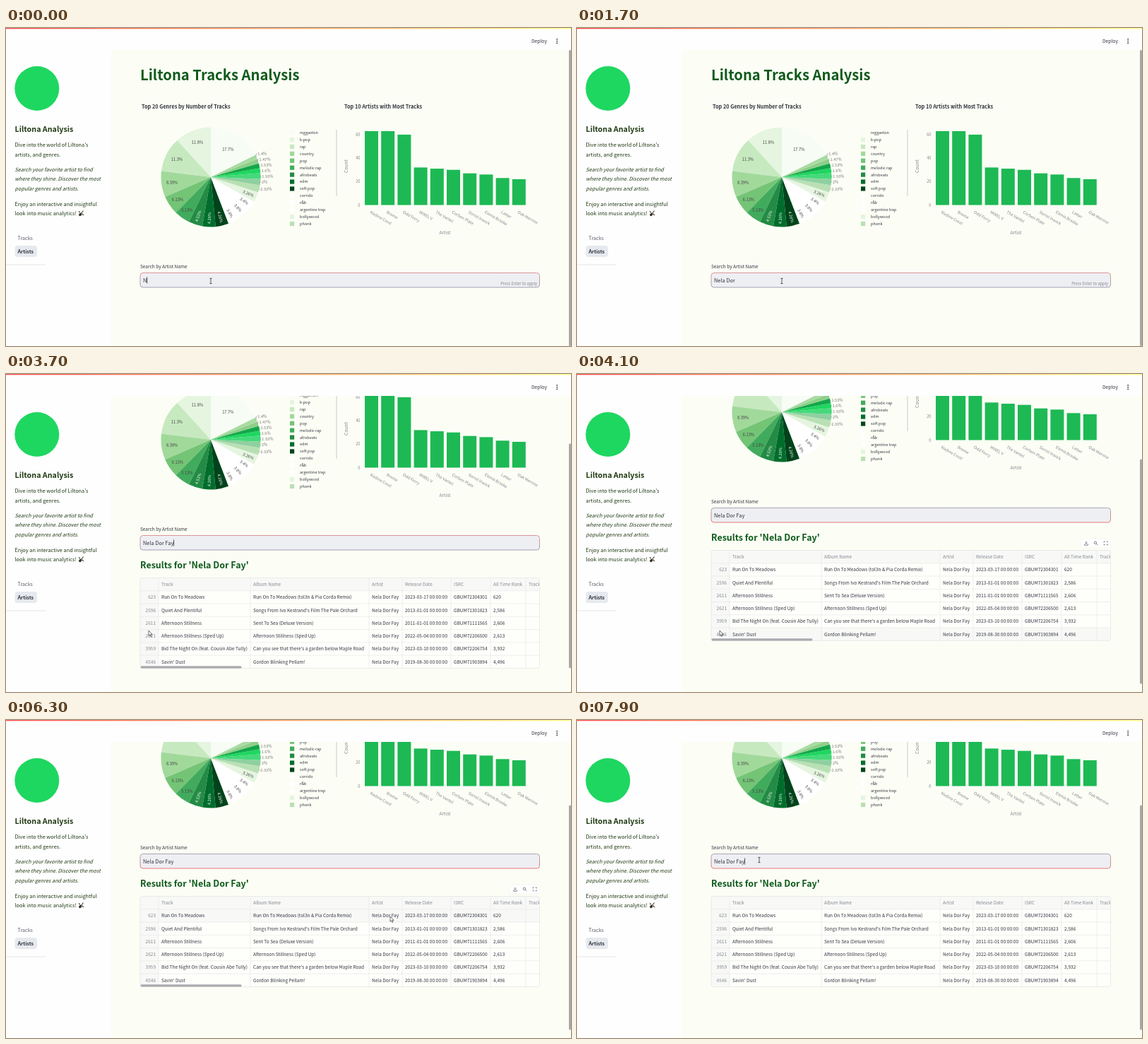
Animation of 800x450 px, one loop 8 s. Source, as an HTML page:

```html
<!DOCTYPE html>
<html lang="en">
<head>
<meta charset="utf-8">
<title>Tracks Analysis</title>
<style>
html, body { margin: 0; width: 100%; height: 100%; overflow: hidden; background: #fefefe; }
svg { display: block; }
text { font-family: "Noto Sans CJK JP", "Noto Sans CJK SC", "Noto Sans", sans-serif; white-space: pre; }
</style>
</head>
<body>
<svg id="stage" width="800" height="450" viewBox="0 0 800 450"></svg>
<script>
const LOOP = 8000, STEP = 100;
const ARTIST = 'Nela Dor Fay', BRAND = 'Liltona';
const INK = '#31333f', GRAY = '#83868f', GREEN = '#0f5a1c', LEAF = '#1f3a12';
const $ = id => document.getElementById(id);

// Text is placed by the vertical middle of its capitals.
const text = (x, y, size, str, fill = INK, extra = '') =>
  `<text x="${x}" y="${(y + size * .365).toFixed(2)}" font-size="${size}" fill="${fill}" ${extra}>${str.replace(/&/g, '&amp;')}</text>`;
const rect = (x, y, w, h, fill, extra = '') =>
  `<rect x="${x}" y="${y}" width="${w}" height="${h}" fill="${fill}" ${extra}/>`;
const line = (d, stroke, w = .6) => `<path d="${d}" fill="none" stroke="${stroke}" stroke-width="${w}"/>`;
const BOLD = 'font-weight="700"', MID = 'text-anchor="middle"', END = 'text-anchor="end"';

function pie() {
  const shares = [17.7, 11.8, 11.3, 8.39, 6.13, 5.13, 4.53, 4.26, 4.26, 3.8, 3.8, 3.4, 3.26, 2.33, 2, 1.93, 1.6, 1.53, 1.47, 1.4];
  const fills = ['#f7fcf5', '#e5f5e0', '#c7e9c0', '#a1d99b', '#74c476', '#41ab5d', '#238b45', '#006d2c', '#00441b',
    '#fff', '#fff', '#fff', '#e5f5e0', '#b9e0b4', '#8fd0a0', '#45d97a', '#1ed760', '#12a84a', '#8fce8a', '#a8dba2'];
  const genres = ['reggaeton', 'k-pop', 'rap', 'country', 'pop', 'melodic rap', 'afrobeats', 'edm', 'soft pop',
    'corrido', 'r&b', 'argentine trap', 'bollywood', 'phonk'];
  const at = (deg, r) => [290 + r * Math.sin(deg * Math.PI / 180), 211 - r * Math.cos(deg * Math.PI / 180)];
  let out = '', labels = '', a = shares[0] * 3.6;
  shares.forEach((p, i) => {
    const b = a - p * 3.6, mid = ((a + b) / 2 + 360) % 360;
    out += `<path d="M290 211L${at(a, 70.5)}A70.5 70.5 0 0 0 ${at(b, 70.5)}Z" fill="${fills[i]}"/>`;
    if (i > 12) {
      const [x, y] = at(mid, 70), ly = i === 13 ? 228 : 178 + (19 - i) * 8;
      labels += line(`M${x} ${y}V${ly}h1.5`, '#777', .5) + text(x + 2.3, ly, 5.6, p + '%', '#777');
    } else {
      const [x, y] = at(mid, i ? Math.min(58, 51 + 1.5 * i) : 46);
      const turn = i < 6 ? 0 : mid > 180 ? mid + 90 : mid - 90;
      labels += text(x, y, 5.7, p + '%', i > 5 && i < 9 ? '#fff' : '#444', `${MID} transform="rotate(${turn} ${x} ${y})"`);
    }
    a = b;
  });
  genres.forEach((g, i) => {
    const y = 148 + i * 9.92;
    labels += rect(402, y - 3, 6.2, 6.2, fills[i]) + text(416, y, 5.5, g);
  });
  return out + labels + line('M468 144V238', '#c8cbc8', 1);
}

function bars() {
  const names = ['Nadine Crost', 'Brome', 'Odd Ferry', 'MIREL V', 'The Vantel', 'Corben Plate', 'Sorrel Inwick',
    'Elenia Brasko', 'Latter', 'Oak Merrine'];
  const counts = [63, 63, 60, 32, 31, 30, 27, 26, 23, 22];
  let out = '';
  counts.forEach((n, i) => {
    const x = 508 + i * 23.2, h = n * 1.66;
    out += rect(x, 250.5 - h, 19, h, '#1db954') +
      text(x + 8, 260, 5.7, names[i], GRAY, `transform="rotate(30 ${x + 8} 260)"`);
  });
  for (let v = 0; v <= 60; v += 20) out += text(501.5, 250.5 - v * 1.66, 5.7, '' + v, GRAY, END);
  return out + text(621.5, 290, 6.5, 'Artist', GRAY, MID) +
    text(481.5, 195.5, 6.7, 'Count', GRAY, `${MID} transform="rotate(-90 481.5 195.5)"`);
}

const TOP = 406.5, ROW = 18.27;
function table() {
  const edges = [216, 346, 514, 561, 630, 686, 736];
  const rows = [
    ['', 'Track', 'Album Name', 'Artist', 'Release Date', 'ISRC', 'All Time Rank', 'Track ID'],
    ['623', 'Run On To Meadows', 'Run On To Meadows (tol3n & Pia Corda Remix)', ARTIST, '2023-03-17', 'GBUM72304301', '620'],
    ['2596', 'Quiet And Plentiful', 'Songs From Ivo Kestrand\'s Film The Pale Orchard', ARTIST, '2013-01-01', 'GBUM71301823', '2,586'],
    ['2611', 'Afternoon Stillness', 'Sent To Sea (Deluxe Version)', ARTIST, '2011-01-01', 'GBUM71111565', '2,606'],
    ['2621', 'Afternoon Stillness (Sped Up)', 'Afternoon Stillness (Sped Up)', ARTIST, '2022-05-04', 'GBUM72206500', '2,613'],
    ['3959', 'Bid The Night On (feat. Cousin Abe Tully)', 'Can you see that there\'s a garden below Maple Road', ARTIST, '2023-03-10', 'GBUM72206754', '3,932'],
    ['4546', 'Savin\' Dust', 'Gordon Blinking Pellam!', ARTIST, '2019-08-30', 'GBUM71903894', '4,496']];
  let out = rect(190, TOP, 565.5, ROW * 7, '#fefffb', 'rx="3"') + rect(190, TOP, 565.5, ROW, '#f8f9f7') +
    rect(190, TOP, 26, ROW * 7, '#f8f9f7') + rect(190, 0, 565.5, ROW, '#f8f9f7', 'id="hover"');
  edges.forEach(x => out += line(`M${x} ${TOP}v${ROW * 7}`, '#e3e5e6'));
  rows.forEach((cells, r) => {
    const y = TOP + ROW * (r + .5);
    if (r) out += line(`M190 ${TOP + ROW * r}H755.5`, '#e3e5e6');
    cells.forEach((c, i) => {
      if (r && i === 4) c += ' 00:00:00';
      out += i ? text(edges[i - 1] + 4, y, 6.5, c, r ? INK : GRAY) : text(212, y, 6.5, c, GRAY, END);
    });
  });
  return `<clipPath id="grid">${rect(190, TOP, 565.5, ROW * 7, '#000', 'rx="3"')}</clipPath><g clip-path="url(#grid)">${out}</g>` +
    rect(190, TOP, 565.5, ROW * 7, 'none', 'rx="3" stroke="#e0e2e3" stroke-width=".7"') +
    rect(190.5, TOP + ROW * 7 - 3.2, 143, 3.2, '#a9abaf', 'id="hbar" rx="1.5"') +
    `<g id="tools">${rect(713, 390, 42.5, 13, '#fff', 'rx="3" stroke="#eceeee" stroke-width=".5"')}
    ${line('M721 393.6v3.6m-1.6-1.4l1.6 1.6 1.6-1.6M718.6 397.6v1.6h4.8v-1.6', '#60636f', .8)}
    <circle cx="734" cy="395.8" r="1.7" fill="none" stroke="#60636f" stroke-width=".8"/>
    ${line('M735.3 397.1l2 2M746.2 395.4v-1.5h1.5m2 0h1.5v1.5m0 2v1.5h-1.5m-2 0h-1.5v-1.5', '#60636f', .8)}</g>`;
}

function sidebar() {
  const note = (y, str, extra) => text(12.5, y, extra ? 7.25 : 7.36, str, LEAF, extra);
  const it = 'font-style="italic"';
  return rect(0, 0, 148.5, 450, '#fefefe') + '<circle cx="43.8" cy="85.5" r="31.5" fill="#1ed760"/>' +
    text(12.5, 143.3, 10.7, BRAND + ' Analysis', LEAF, BOLD) +
    note(165.5, `Dive into the world of ${BRAND}'s`) + note(179, 'artists, and genres.') +
    note(200.3, 'Search your favorite artist to find', it) + note(213.7, 'where they shine. Discover the most', it) +
    note(227.2, 'popular genres and artists.', it) +
    note(249, 'Enjoy an interactive and insightful') + note(262.5, 'look into music analytics!') +
    `<ellipse cx="105.2" cy="264" rx="2.4" ry="1.8" fill="#3a3328" transform="rotate(-40 105.2 264)"/>` +
    line('M105.5 263.5l4-5M103 259.5l2 1.6M108 262.5l1.6 2.6', '#3a3328', 1.1) +
    text(16.5, 297.5, 7.15, 'Tracks', '#5f626d') + rect(12.5, 308, 31.5, 16, '#e6e9ee', 'rx="4"') +
    text(16.5, 316.2, 7.1, 'Artists', INK, BOLD) + line('M0 335H56', '#dcdee2', .8);
}

$('stage').innerHTML = `
<defs>
  <linearGradient id="strip"><stop stop-color="#ff4b4b"/><stop offset="1" stop-color="#fffd80"/></linearGradient>
  <linearGradient id="edge" x1="0" y1="0" x2="0" y2="1"><stop offset=".05" id="edgeTop"/><stop offset=".95" id="edgeBottom"/></linearGradient>
</defs>
${rect(0, 0, 800, 450, '#fcfef5')}
<g id="page">
  ${text(190, 66.5, 20.2, BRAND + ' Tracks Analysis', GREEN, BOLD)}
  ${text(192, 111.7, 7.3, 'Top 20 Genres by Number of Tracks', INK, BOLD)}
  ${text(479, 111.7, 7.3, 'Top 10 Artists with Most Tracks', INK, BOLD)}
  ${pie()}${bars()}
  ${text(190, 338, 6.5, 'Search by Artist Name')}
  ${rect(190, 346.5, 565.5, 20.5, '#eeeff3', 'rx="4" stroke="url(#edge)" stroke-width=".9"')}
  ${text(194, 357, 7.4, '', INK, 'id="query"')}
  ${rect(0, 352.5, .8, 9, '#222', 'id="caret"')}
  ${text(752, 362, 5.6, 'Press Enter to apply', '#85878f', END + ' id="hint"')}
  <g id="results">${text(190, 388.3, 12.5, `Results for '${ARTIST}'`, GREEN, BOLD)}${table()}</g>
</g>
${rect(0, 0, 800, 31, '#fefefe')}${sidebar()}
${rect(0, 0, 800, 1.3, 'url(#strip)')}
${text(744, 18.5, 6.7, 'Deploy')}
${[15.8, 18.6, 21.4].map(y => `<circle cx="780.2" cy="${y}" r=".9" fill="${INK}"/>`).join('')}
${rect(797, 31, 3, 419, '#a6a8aa', 'id="thumb" rx="1.5"')}
<g id="mouse">
  <path id="beam" d="M-1.6 -3.6H1.6M0 -3.6V3.6M-1.6 3.6H1.6" fill="none" stroke="#333" stroke-width=".8"/>
  <path id="arrow" d="M-2 -4V3.2L-.4 1.8L.8 4.4L2 3.9L.9 1.4H3.1Z" fill="#fff" stroke="#333" stroke-width=".7"/>
</g>`;

const KEYS = [0, 300, 600, 1000, 1150, 1300, 1450, 1600, 1900, 2000, 2150, 2300], ENTER = 2600;
const PATH = [[0, 290, 358], [2900, 290, 358], [3500, 204, 367], [4200, 204, 367], [5200, 395, 297],
  [5900, 546, 282], [6900, 546, 282], [7900, 258, 198]];
const SCROLL = [[0, 0], [3600, 0], [3700, 118], [3800, 148], [3900, 157]];

function track(keys, t, ease = u => u) {
  const i = keys.findIndex(k => k[0] > t);
  if (i < 0) return keys[keys.length - 1].slice(1);
  const a = keys[i - 1], b = keys[i], u = ease((t - a[0]) / (b[0] - a[0]));
  return a.slice(1).map((v, j) => v + (b[j + 1] - v) * u);
}
const set = (id, attrs) => { for (const k in attrs) $(id).setAttribute(k, attrs[k]); };
const show = (id, on) => $(id).style.display = on ? '' : 'none';

function draw(now) {
  const t = Math.floor(now % LOOP / STEP) * STEP;
  const done = t >= ENTER, [scroll] = track(SCROLL, t);
  const [x, y] = track(PATH, t, u => u * u * (3 - 2 * u));
  set('page', { transform: `translate(0 ${-scroll})` });

  $('query').textContent = ARTIST.slice(0, KEYS.filter(k => k <= t).length);
  set('caret', { x: 194 + $('query').getComputedTextLength() });
  show('caret', (t % 1000 < 500) === (t < 3000));
  show('hint', !done);
  show('results', done);
  const late = t >= 3800;
  set('edgeTop', { 'stop-color': late ? '#a09cad' : '#d98a90' });
  set('edgeBottom', { 'stop-color': late ? '#e8696c' : '#9a95ab' });

  const row = Math.floor((y + scroll - TOP) / ROW), over = scroll > 0 && row >= 0;
  show('hbar', over);
  show('tools', over && scroll === 157);
  show('hover', over && scroll === 157 && row > 0);
  set('hover', { y: TOP + row * ROW });

  set('thumb', { y: 31 + scroll * .57, height: !done ? 419 : scroll ? 318 : 298 });
  const typing = y + scroll <= 368;
  show('beam', typing);
  show('arrow', !typing);
  set('mouse', { transform: `translate(${x} ${y})` });
}

let start;
function loop(now) {
  start ??= now;
  draw(now - start);
  requestAnimationFrame(loop);
}
requestAnimationFrame(loop);
</script>
</body>
</html>
```
